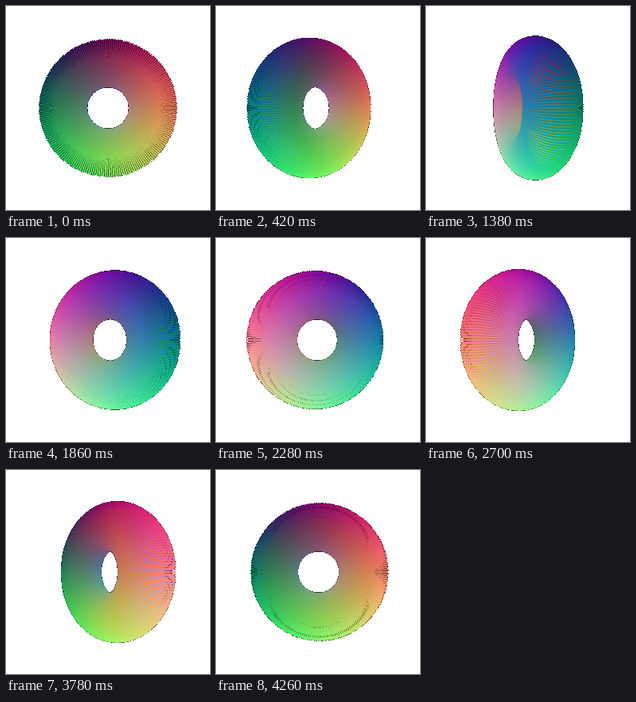
Write an HTML page with a canvas that moves like this. It is 256 by 256 pixels and loops after 4.32 s.

```html
<!DOCTYPE html>
<html lang="en">
<head>
<meta charset="utf-8">
<title>Turning ring</title>
<style>
  html, body { margin: 0; width: 100%; height: 100%; overflow: hidden; background: #fff; }
  canvas { display: block; width: 100vw; height: 100vh; }
</style>
</head>
<body>
<canvas id="stage" width="256" height="256"></canvas>
<script>
const SIZE = 256, SUB = 3, WIDE = SIZE * SUB;
const STEPS = 72, STEP_MS = 60;
const RING = 55.3, TUBE = 28.3, REACH = RING + TUBE;
const EYE = (SIZE / 2) / Math.tan(Math.PI / 6);
const HOOPS = 199, DOTS = 270, PEN = 2;

const ctx = document.getElementById('stage').getContext('2d');
const count = HOOPS * DOTS;
const pos = new Float32Array(count * 3);
const tint = new Uint8ClampedArray(count * 3);
const depth = new Float32Array(WIDE * WIDE);
const owner = new Int32Array(WIDE * WIDE);
const cache = [];

// The ring is a set of hoops, coloured by their place in space.
for (let h = 0, i = 0; h < HOOPS; h++) {
  const u = h / HOOPS * 2 * Math.PI;
  for (let d = 0; d < DOTS; d++, i += 3) {
    const v = d / DOTS * 2 * Math.PI;
    const far = RING + TUBE * Math.cos(v);
    const p = [far * Math.cos(u), far * Math.sin(u), TUBE * Math.sin(v)];
    pos.set(p, i);
    tint.set([p[0], p[1], -p[2]].map(c => 127.5 * (1 + c / REACH)), i);
  }
}

// Row offsets and half widths of the round pen tip.
const tip = [];
const rad = PEN * SUB / 2;
for (let y = -rad + 0.5; y < rad; y++) tip.push([y, Math.sqrt(rad * rad - y * y)]);

function plot(angle) {
  const c = Math.cos(angle), s = Math.sin(angle);
  depth.fill(-1e9);
  owner.fill(-1);
  for (let i = 0; i < count * 3; i += 3) {
    const z = pos[i + 2] * c - pos[i] * s;
    const k = EYE / (EYE - z) * SUB;
    const x = WIDE / 2 + (pos[i] * c + pos[i + 2] * s) * k;
    const y = WIDE / 2 + pos[i + 1] * k;
    for (const [dy, half] of tip) {
      const row = Math.floor(y + dy) * WIDE;
      const end = row + Math.round(x + half);
      for (let q = row + Math.round(x - half); q < end; q++) {
        if (z > depth[q]) {
          depth[q] = z;
          owner[q] = i;
        }
      }
    }
  }
}

// Partly covered pixels fade to black; nearly empty ones stay white.
function resolve() {
  const img = ctx.createImageData(SIZE, SIZE);
  const total = SUB * SUB;
  for (let y = 0, o = 0; y < SIZE; y++) {
    for (let x = 0; x < SIZE; x++, o += 4) {
      let r = 0, g = 0, b = 0, hits = 0;
      for (let j = 0; j < SUB; j++) {
        const q = (y * SUB + j) * WIDE + x * SUB;
        for (let n = q; n < q + SUB; n++) {
          const id = owner[n];
          if (id < 0) continue;
          r += tint[id];
          g += tint[id + 1];
          b += tint[id + 2];
          hits++;
        }
      }
      if (hits < total / 3) r = g = b = 255 * total;
      img.data[o] = r / total;
      img.data[o + 1] = g / total;
      img.data[o + 2] = b / total;
      img.data[o + 3] = 255;
    }
  }
  return img;
}

function picture(step) {
  if (!cache[step]) {
    plot(step / STEPS * 2 * Math.PI);
    cache[step] = resolve();
  }
  return cache[step];
}

const start = performance.now();
let shown = -1;

function tick() {
  const step = Math.floor((performance.now() - start) / STEP_MS) % STEPS;
  if (step !== shown) {
    ctx.putImageData(picture(step), 0, 0);
    shown = step;
  }
  requestAnimationFrame(tick);
}
tick();
</script>
</body>
</html>
```
